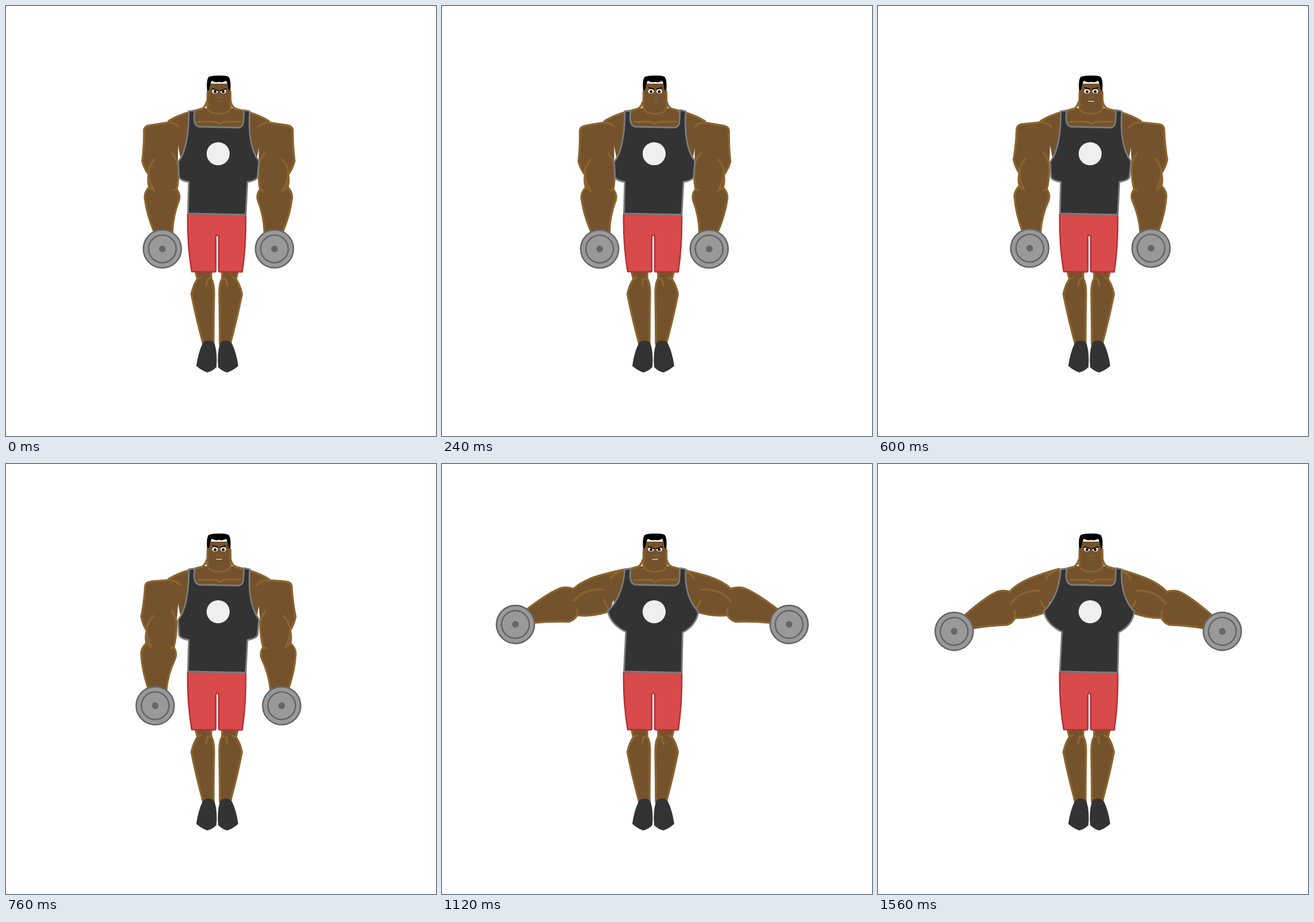
Recreate the animation shown at these times as an HTML page. Size 748 by 748 pixels, loop 1600 ms.

```html
<!DOCTYPE html>
<html lang="en">
<head>
<meta charset="utf-8">
<title>Lateral raise</title>
<style>
  html, body { margin: 0; width: 100%; height: 100%; overflow: hidden; background: #fff; }
  svg { display: block; width: 100vw; height: 100vh; }
  .skin { fill: #74532c; stroke: #8b642f; }
  .line { fill: none; stroke: #8b642f; }
  .shirt { fill: #333; stroke: #7b7b7b; }
  .shorts { fill: #d94a4a; stroke: #b23036; }
  .ink { fill: none; stroke: #000; stroke-width: 1.6; }
</style>
</head>
<body>
<svg viewBox="0 0 748 748" stroke-width="3.4" stroke-linecap="round" stroke-linejoin="round">
  <defs>
    <g id="plate" stroke="#666">
      <circle r="33" fill="#999" stroke-width="2.6"/>
      <circle r="24" fill="none" stroke-width="2.6"/>
      <circle r="5.8" fill="#666" stroke="none"/>
    </g>
    <g id="armLow">
      <path class="skin" d="M300 210Q293 202 280 203L250 207.500Q240 209 240 217Q240.500 242 237 270Q241 284 248 293Q246 305 249 315Q240 325 241.500 335Q245 363 258 394L289.500 394Q290 366 301 338Q304 328 297 319Q301 300 299 274"/>
      <path class="line" d="M258 267C244 283 245 298 258 322M289 256Q297 266 299 276M249 315L254 319M297 319L292 321"/>
      <use href="#plate" x="272" y="422.500"/>
    </g>
    <g id="armHigh">
      <path class="skin" d="M318 184Q294 188 268 195Q242 203 229 215Q219 211 209 212.500Q189 218 147 248L158 272Q190 270 219 272Q230 269 233 261Q258 265 290 256"/>
      <path class="line" d="M229 236Q246 215 281 218M294 199Q299 189 318 185M234 250Q235 257 232 264M281 236Q284 246 290 254"/>
      <use href="#plate" x="126" y="274"/>
    </g>
    <g id="trap">
      <path fill="#74532c" d="M371 176L342 178L318 184L280 201L296 225L303 262L371 262Z"/>
      <path class="line" d="M349 167Q346 179 336 180L318 185Q300 190 283 200"/>
    </g>
    <g id="leg">
      <path class="skin" d="M329 460L333 475Q326 485 322.500 501Q330 540 343 588L361 588Q361 545 362 500Q362 482 357 474L357 460"/>
      <path class="line" d="M350 476L348 487M333 475L339 472M357 474L350 475"/>
    </g>
    <path id="shoe" fill="#333" d="M342 587Q345 582 353 582Q361 582 363 588Q368 604 366 628Q360 635 350 637.500Q340 634 331 626Q334 604 342 587Z"/>
  </defs>

  <use href="#leg"/>
  <use href="#leg" transform="translate(733) scale(-1 1)"/>
  <use href="#shoe"/>
  <use href="#shoe" transform="translate(735) scale(-1 1)"/>

  <use href="#trap"/>
  <use href="#trap" transform="translate(740) scale(-1 1)"/>
  <path class="line" d="M335 201.500L362 201.500Q368 202 371 205.500Q375 202 380 201.500L408 201"/>

  <g id="low">
    <use href="#armLow"/>
    <g transform="translate(739) scale(-1 1)"><use href="#armLow"/></g>
  </g>
  <g id="high">
    <use href="#armHigh"/>
    <g transform="translate(731.500) scale(-1 1)"><use href="#armHigh"/></g>
  </g>

  <path class="shorts" stroke-width="2.4" d="M316 362Q315 415 323 462L363 462.500Q365 462 365 460L365 401Q367 396 370 401L370 460Q370 462 372 462.500L411 462.500Q418 415 417 362Z"/>
  <path id="shirt" class="shirt" stroke-width="2.8"/>
  <circle cx="369" cy="257" r="20" fill="#efefef"/>

  <path fill="#74532c" d="M351 135L350 176Q351 187 371 187.500Q390 187 391 176L390 135Z"/>
  <path class="line" stroke-width="3" d="M350.500 149L350 175Q351 187 371 187.500Q390 187 391 175L390.500 149"/>
  <path d="M350 148Q348 128 353 123Q361 120.500 371 121Q382 120.500 387 123Q392 128 390 148L387 145Q386 136 383 130Q377 134 371 132Q364 134 358 130Q355 136 353.500 145Z"/>
  <path class="line" stroke-width="1.500" d="M367 159L376 159"/>
  <g id="eyes">
    <ellipse cx="363.500" cy="148.500" rx="5" ry="3.800" fill="#fff"/>
    <ellipse cx="378" cy="148.500" rx="5" ry="3.800" fill="#fff"/>
    <circle cx="363.700" cy="149" r="2.500"/>
    <circle cx="377.800" cy="149" r="2.500"/>
  </g>
  <path id="frown" fill="#74532c" d="M357 143L371 148L384 143Z"/>
  <path id="brows" class="ink"/>
  <path id="calm" class="line" stroke-width="1.600" d="M370 165.500L372 166.500L374 165.500"/>
  <path id="teeth" fill="#ead9b5" stroke="#4b3218" stroke-width=".8" d="M364.500 164.600L377 164.600L376 167L365.500 167Z"/>
</svg>
<script>
const LOOP = 1600, STEP = 40, SPEED = 0.0091;   // ms, ms, degrees per ms
const RAISE = 840, EYES_OPEN = 1000, BROWS_UP = 160, GRIT = 600, RELAX = 1440;

const collar = 'M318 183L328.500 182C326 194 326 209 337 210L405 211.500Q413 210 413 200L414 181L424 183';
const shirts = {
  low: collar + 'Q420 244 440 270L437.500 298Q434 304 420 306L417 363L316.500 361L318 306Q304 304 301 298L299.500 271Q318 248 318 183Z',
  high: collar + 'Q421 231 446 257Q442 281 418.500 293L417 363L316.500 361L320 292Q293 279 288.500 256Q315 230 318 183Z'
};
const browShapes = {
  frown: 'M359 144L370 147.500M383 144L372.500 147.500',
  up: 'M359.500 142L369 144.500M382.500 142L373 144.500',
  shut: 'M359 146L369 147.500M382.500 146L373 147.500'
};

const $ = id => document.getElementById(id);
const show = (id, on) => $(id).style.display = on ? '' : 'none';

function swing(id, angle, x, y) {
  for (const arm of $(id).querySelectorAll('use'))
    arm.setAttribute('transform', `rotate(${angle} ${x} ${y})`);
}

function draw(t) {
  const raised = t >= RAISE;
  const shut = raised && t < EYES_OPEN;
  const mood = shut ? 'shut' : t >= BROWS_UP && !raised ? 'up' : 'frown';
  const grit = t >= GRIT && t < RELAX;

  show('low', !raised);
  show('high', raised);
  swing('low', SPEED * Math.abs(t - 160) - 1.45, 295, 243);
  swing('high', 0.25 - SPEED * Math.abs(t - 907), 301, 217);
  $('shirt').setAttribute('d', raised ? shirts.high : shirts.low);

  show('eyes', !shut);
  show('frown', mood === 'frown');
  $('brows').setAttribute('d', browShapes[mood]);
  show('teeth', grit);
  show('calm', !grit);
}

const start = performance.now();
function tick() {
  const t = (performance.now() - start) % LOOP;
  draw(Math.floor(t / STEP) * STEP);
  requestAnimationFrame(tick);
}
tick();
</script>
</body>
</html>
```
